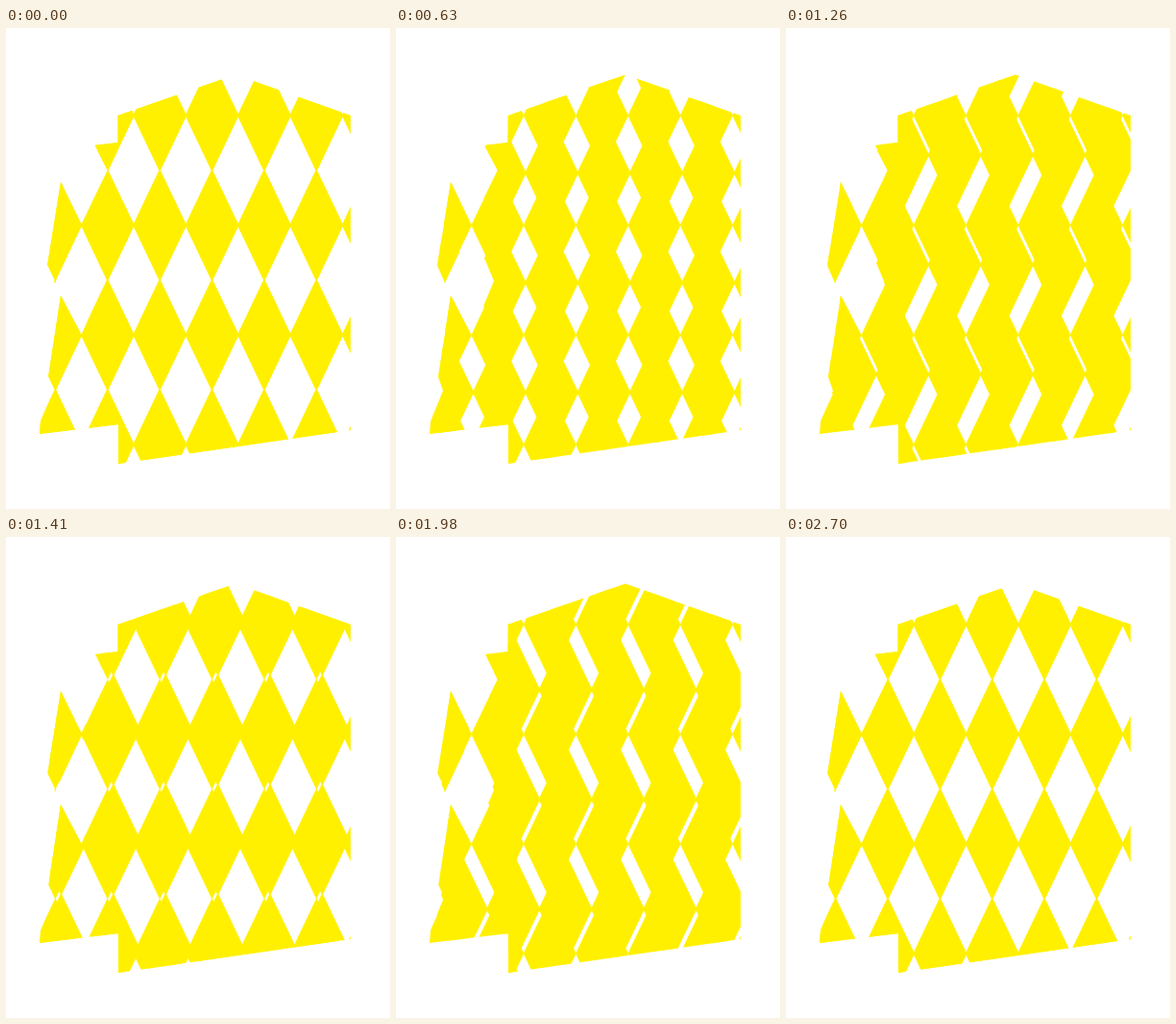
These frames come from a looping animation (400x500 px, 3600 ms). An HTML page with a canvas:

```html
<!DOCTYPE html>
<html lang="en">
<head>
<meta charset="utf-8">
<title>Harlequin</title>
<style>
html, body { margin: 0; width: 100%; height: 100%; overflow: hidden; background: #fff; }
canvas { display: block; }
</style>
</head>
<body>
<canvas id="stage" width="400" height="500"></canvas>
<script>
const ctx = document.getElementById('stage').getContext('2d');
const YELLOW = '#fff000';
const LOOP = 3600, LEG = 600, STEP = 30, STEPS = 10;
const HW = 27.2, HH = 57;       // half width and height of a diamond
const CX = 105.8, CY = 205;     // centre of one diamond

// Lattice point, counted in half diamonds from that centre
const node = (i, j) => [CX + i * HW, CY + j * HH];

// Resting places of the sliding layer, in half diamonds
const stops = [[0, 0], [0, -0.95], [0.7, -0.96], [0.02, -2.56], [0.99, -2.98], [2.01, -4]];

// Gabled wall, and a wing on its left that follows the lattice
const wall = [[116.5, 91], [239, 48.5], [359, 91], [359, 418], [117, 453]];
const wing = [
  [130, 117.5], [130, 410.5], [35, 422], [36, 409], [49, 377], [44, 363], [57, 278],
  node(-1, 2), [102, 263], node(-1, 0.03),
  [51, 265], [43, 247], [57, 160], node(-1, -0.02), node(0, -1), [92, 122]
];

function tracePoly(points) {
  points.forEach(([x, y], i) => i ? ctx.lineTo(x, y) : ctx.moveTo(x, y));
  ctx.closePath();
}

// Diamonds repeat every two half diamonds both ways
function drawLattice(di, dj, seam) {
  ctx.beginPath();
  for (let i = -6; i < 14; i += 2) {
    for (let j = -6; j < 10; j += 2) {
      const u = i + di % 2, v = j + dj % 2;
      tracePoly([node(u, v - 1), node(u + 1, v), node(u, v + 1), node(u - 1, v)]);
    }
  }
  ctx.fill();
  ctx.lineWidth = seam;
  ctx.stroke();
}

// Straight legs in ten steps, each followed by a rest
function offsetAt(t) {
  const leg = Math.min(Math.floor(t / LEG), stops.length - 2);
  const k = Math.min(STEPS, Math.floor((t - leg * LEG) / STEP)) / STEPS;
  return stops[leg].map((v, i) => v + (stops[leg + 1][i] - v) * k);
}

function draw(t) {
  ctx.fillStyle = '#fff';
  ctx.fillRect(0, 0, 400, 500);
  ctx.save();
  ctx.beginPath();
  tracePoly(wall);
  tracePoly(wing);
  ctx.clip();
  ctx.fillStyle = ctx.strokeStyle = YELLOW;
  drawLattice(0, 0, 0.6);
  drawLattice(...offsetAt(t), 1.4);
  ctx.restore();
}

const start = performance.now();
function tick() {
  draw((performance.now() - start) % LOOP);
  requestAnimationFrame(tick);
}
tick();
</script>
</body>
</html>
```
